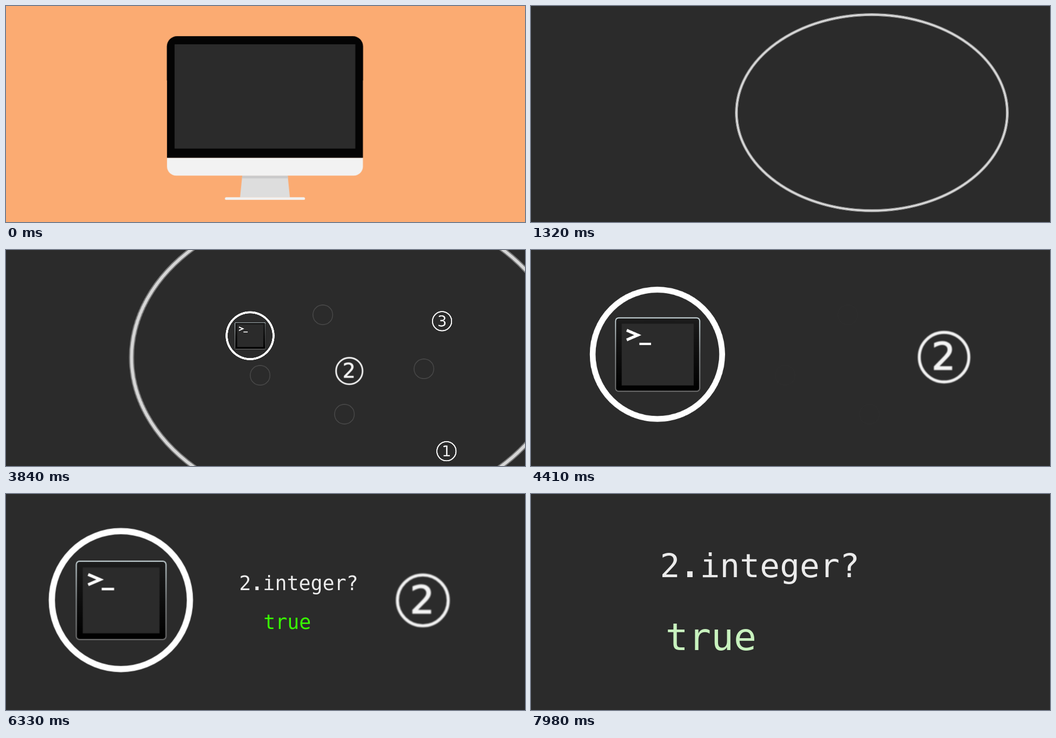
An HTML page for the animation above (8000 ms loop, 960 by 400 pixels).

```html
<!DOCTYPE html>
<html lang="en">
<head>
<meta charset="utf-8">
<title>Integer check</title>
<style>
  html, body { margin: 0; width: 100%; height: 100%; overflow: hidden; background: #fbab72; }
  svg { display: block; width: 100vw; height: 100vh; }

  /* One 8 s loop: 1% = 80 ms */
  g, text { animation: 8s linear infinite; }
  .move { animation-timing-function: cubic-bezier(.364, .182, .636, .818); }

  .monitor { transform-origin: 479px 170.6px; animation-name: zoom; }
  @keyframes zoom { 0% { transform: none; } 10.875%, 100% { transform: scale(2.906); } }

  /* Pop-ins, in order of appearance */
  .pop { --over: 1.21; }
  .p1 { --over: 1.05; animation-name: pop1; }
  .p2 { animation-name: pop2; }
  .p3 { animation-name: pop3; }
  .p4 { animation-name: pop4; }
  .p5 { animation-name: pop5; }
  .p6 { animation-name: pop6; }
  .p7 { --over: 1.26; animation-name: pop7; }
  @keyframes pop1 { 0%, 13.125% { transform: scale(0); } 14.475% { transform: scale(var(--over)); } 16.125%, 100% { transform: scale(1); } }
  @keyframes pop2 { 0%, 16.5%   { transform: scale(0); } 17.85%  { transform: scale(var(--over)); } 19.5%,   100% { transform: scale(1); } }
  @keyframes pop3 { 0%, 19.875% { transform: scale(0); } 21.225% { transform: scale(var(--over)); } 22.875%, 100% { transform: scale(1); } }
  @keyframes pop4 { 0%, 23.25%  { transform: scale(0); } 24.6%   { transform: scale(var(--over)); } 26.25%,  100% { transform: scale(1); } }
  @keyframes pop5 { 0%, 26.625% { transform: scale(0); } 27.975% { transform: scale(var(--over)); } 29.625%, 100% { transform: scale(1); } }
  @keyframes pop6 { 0%, 30%     { transform: scale(0); } 31.35%  { transform: scale(var(--over)); } 33%,     100% { transform: scale(1); } }
  @keyframes pop7 { 0%, 33.375% { transform: scale(0); } 34.725% { transform: scale(var(--over)); } 36.375%, 100% { transform: scale(1); } }

  /* Set of numbers */
  .set { animation-name: set; fill: none; }
  @keyframes set {
    0%, 45% { transform: translate(630.5px, 197.5px) scale(1); }
    55.875%, 100% { transform: translate(632px, 203px) scale(3.6); }
  }
  .slots { animation-name: slots; fill: none; stroke: #5c5c5c; stroke-width: 1.3; }
  @keyframes slots { 0%, 45% { opacity: 1; } 55.875%, 100% { opacity: 0; } }

  .ring { fill: none; stroke: #f4f4f4; stroke-width: 5.6; }
  .num text { font: 72px "DejaVu Sans", sans-serif; fill: #f4f4f4; text-anchor: middle; }
  .one { animation-name: one; }
  .two { animation-name: two; }
  .three { animation-name: three; }
  .soft { filter: blur(.8px); }
  .soft text { stroke: #f4f4f4; stroke-width: 1.4; }
  @keyframes one {
    0%, 45% { transform: translate(702px, 261px) scale(.38); }
    55.875%, 100% { transform: translate(1198px, 752px) scale(.38); }
  }
  @keyframes two {
    0%, 45% { transform: translate(595px, 232px) scale(.38); }
    55.875%, 100% { transform: translate(771px, 197px) scale(1); }
  }
  @keyframes three {
    0%, 45% { transform: translate(727px, 158px) scale(.38); }
    55.875%, 100% { transform: translate(1077px, 43px) scale(.38); }
  }

  .console { animation-name: console; }
  @keyframes console {
    0%, 45% { transform: translate(519px, 148px) scale(.154); }
    55.875% { transform: translate(222px, 195px) scale(.97); }
    64.875%, 100% { transform: translate(212.5px, 196.5px) scale(1); }
  }
  .leave { animation-name: leave; }
  @keyframes leave { 0%, 90% { opacity: 1; } 98.75%, 100% { opacity: 0; } }

  /* Call and result */
  .code text { font: 36.6px "DejaVu Sans Mono", monospace; white-space: pre; }
  .code .dot { font-weight: bold; }
  .grow { animation-timing-function: cubic-bezier(.36, .17, .64, .74); }
  .call { fill: #ebebeb; animation-name: call; }
  @keyframes call {
    0%, 90% { transform: translate(431.3px, 178px) scale(1); }
    99.75%, 100% { transform: translate(238.5px, 154px) scale(1.677); }
  }
  .call text { animation-name: appear; }
  @keyframes appear { 0%, 55.875% { opacity: 0; } 64.875%, 100% { opacity: 1; } }

  .result { animation-name: result; }
  @keyframes result {
    0%, 90% { transform: translate(476.2px, 250px) scale(1); fill: #38ff00; }
    99.75%, 100% { transform: translate(248.8px, 289px) scale(1.91); fill: #c8f2be; }
  }
  .result text { animation-name: gather; animation-timing-function: cubic-bezier(.1, .8, .3, 1); }
  @keyframes gather {
    0%, 70.125% { opacity: 0; letter-spacing: 94px; transform: translate(-126px, -48px); }
    79.125%, 100% { opacity: 1; letter-spacing: 0; transform: translate(0, 0); }
  }
</style>
</head>
<body>
<svg viewBox="0 0 960 400">
  <defs>
    <linearGradient id="rim" x2="0" y2="1">
      <stop stop-color="#d5e4e8"/>
      <stop offset=".5" stop-color="#8f9496"/>
      <stop offset="1" stop-color="#757575"/>
    </linearGradient>
    <linearGradient id="bezel" x2="0" y2="1">
      <stop stop-color="#1c1c1c"/>
      <stop offset="1" stop-color="#000"/>
    </linearGradient>
  </defs>
  <rect width="960" height="400" fill="#fbab72"/>

  <g class="monitor move">
    <path d="M437 314H521L525 354H433Z" fill="#dddddd"/>
    <path d="M437 314H521L521.5 319H436.5Z" fill="#cacaca"/>
    <rect x="405" y="354" width="148" height="5" rx="2.5" fill="#f2f2f2"/>
    <path d="M298 281H660V297A17 17 0 0 1 643 314H315A17 17 0 0 1 298 297Z" fill="#f2f2f2"/>
    <path d="M297.7 138V75A19 19 0 0 1 316.7 56H641.3A19 19 0 0 1 660.3 75V138H660V281H298V138Z" fill="#040404"/>
    <rect x="312" y="71" width="334" height="193" fill="#2b2b2b"/>
  </g>

  <g class="set move">
    <g class="pop p1">
      <ellipse rx="250.5" ry="181.5" stroke="#777" stroke-width="6"/>
      <ellipse rx="250.5" ry="181.5" stroke="#d6d6d6" stroke-width="3.4"/>
    </g>
  </g>

  <g class="slots">
    <svg x="773" y="220" overflow="visible"><g class="pop p2"><circle r="18.3"/></g></svg>
    <svg x="470" y="232" overflow="visible"><g class="pop p4"><circle r="18.3"/></g></svg>
    <svg x="626" y="304" overflow="visible"><g class="pop p4"><circle r="18.3"/></g></svg>
    <svg x="586" y="120" overflow="visible"><g class="pop p6"><circle r="18.3"/></g></svg>
  </g>

  <g class="num one move"><g class="pop p3"><circle class="ring" r="46.5"/><text y="24">1</text></g></g>
  <g class="num three move"><g class="pop p5"><circle class="ring" r="46.5"/><text y="25">3</text></g></g>

  <g class="leave">
    <g class="num two move"><g class="pop soft p3"><circle class="ring" r="47"/><text x="-1" y="24">2</text></g></g>
    <g class="console move">
      <g class="pop p7">
        <circle r="127.7" fill="none" stroke="#fff" stroke-width="11.5"/>
        <rect x="-83.5" y="-73" width="168" height="147" rx="7" fill="url(#rim)"/>
        <rect x="-81.5" y="-71" width="164" height="143" rx="5" fill="url(#bezel)"/>
        <rect x="-70.5" y="-60.5" width="142" height="122" fill="#2b2b2b"/>
        <path d="M-60.5 -47.5L-38.5 -38L-60.5 -28.5" fill="none" stroke="#fff" stroke-width="5.6"/>
        <path d="M-35.5 -20.5H-12.5" stroke="#fff" stroke-width="4.6"/>
      </g>
    </g>
  </g>

  <g class="code">
    <g class="call grow"><text>2<tspan class="dot">.</tspan>integer?</text></g>
    <g class="result grow"><text>true</text></g>
  </g>
</svg>
</body>
</html>
```
